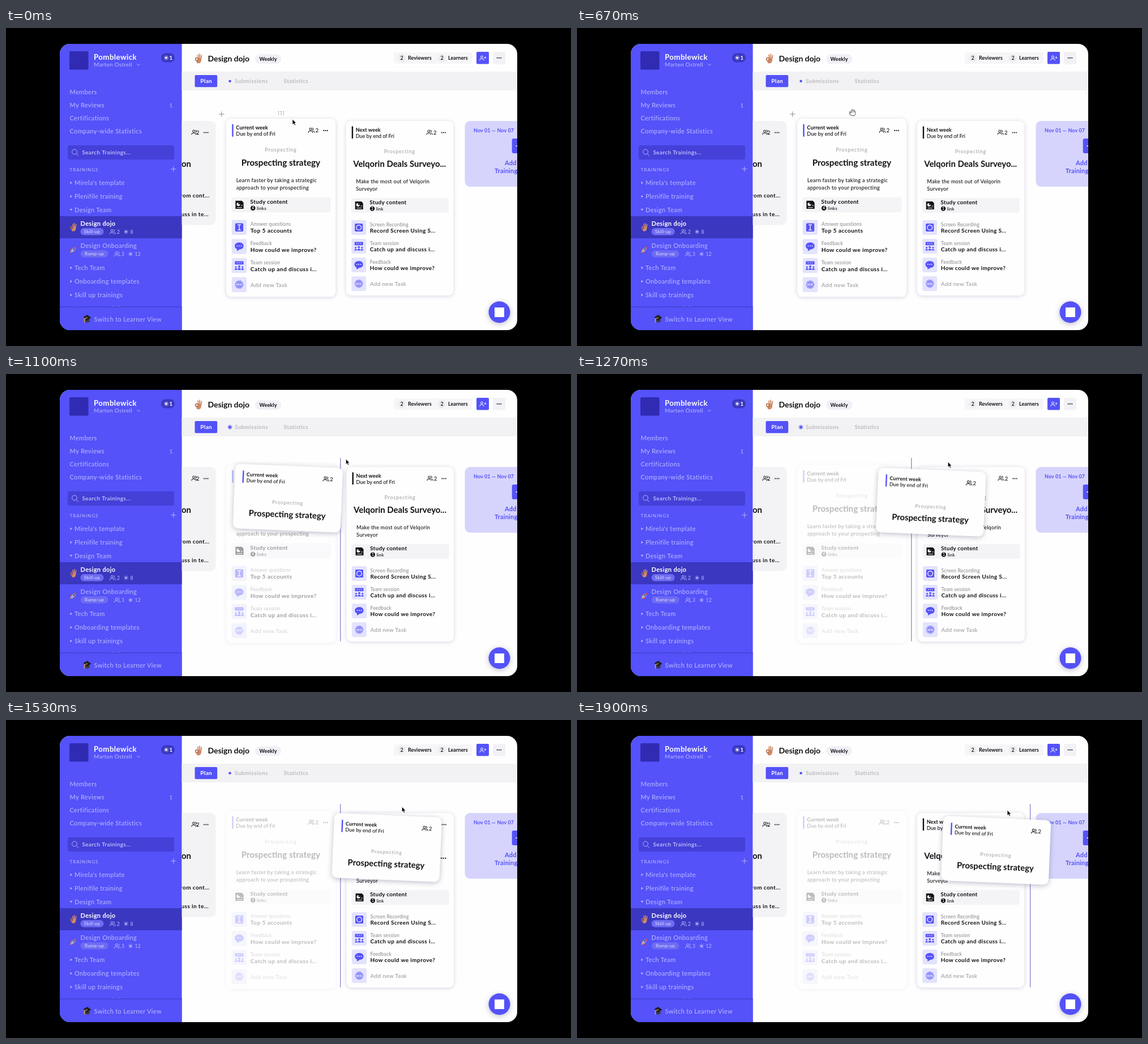
An HTML page that plays this animation: 998x561 px, repeating every 1.93 s.

```html
<!DOCTYPE html>
<html lang="en">
<head>
<meta charset="utf-8">
<title>Training planner</title>
<style>
html, body { margin: 0; width: 100%; height: 100%; overflow: hidden; background: #000; }
svg { display: block; width: 100vw; height: 100vh; font-family: Lato, "Open Sans", sans-serif; }
.shadow { filter: drop-shadow(0 1px 3.5px rgba(40, 38, 110, .2)); }
.lift { filter: drop-shadow(0 2px 5px rgba(40, 38, 90, .3)); }
</style>
</head>
<body>
<svg id="stage" viewBox="0 0 998 561"></svg>
<script>
const LOOP = 1930;
const BLUE = '#5452f8', DEEP = '#3b37c0', PALE = '#b4b2ff', INK = '#111114', GREY = '#a4a4aa', TINT = '#e4e3fd';

const rect = (x, y, w, h, fill, r = 0, extra = '') =>
  `<rect x="${x}" y="${y}" width="${w}" height="${h}" rx="${r}" fill="${fill}" ${extra}/>`;
const circle = (x, y, r, fill, extra = '') => `<circle cx="${x}" cy="${y}" r="${r}" fill="${fill}" ${extra}/>`;
const path = (d, fill, extra = '') => `<path d="${d}" fill="${fill}" ${extra}/>`;
const stroke = (d, color, width = 1) =>
  path(d, 'none', `stroke="${color}" stroke-width="${width}" stroke-linecap="round" stroke-linejoin="round"`);
const group = (x, y, body, extra = '') => `<g transform="translate(${x} ${y})" ${extra}>${body}</g>`;

// y is the optical middle of the line
function text(x, y, str, size, fill, { weight = 500, gap = 0.35, anchor = 'start' } = {}) {
  return `<text x="${x}" y="${y + size * 0.34}" font-size="${size}" font-weight="${weight}" fill="${fill}"
    letter-spacing="${gap}" text-anchor="${anchor}">${str}</text>`;
}

const dots = (x, y, color = INK) => [-3.2, 0, 3.2].map(d => circle(x + d, y, 1.05, color)).join('');
const person = 'M-5 4 V3 Q-5 1.3 -3 1.3 H0 Q2 1.3 2 3 V4';
const head = color => circle(-1.5, -2, 1.9, 'none', `stroke="${color}" stroke-width="1"`);
const people = (x, y, color) => group(x, y, head(color) +
  stroke(person + ' M1.6 -3.9 Q3.4 -3.4 3.4 -2 T1.6 -.2 M3.2 1.4 Q5 1.6 5 3.2 V4', color));
const addPerson = (x, y, color) => group(x, y, head(color) + stroke(person + ' M3 -.8 H6 M4.5 -2.3 V.7', color, .9));
const target = (x, y, color, r = 4) =>
  circle(x, y, r - .5, 'none', `stroke="${color}" stroke-opacity=".45"`) + circle(x, y, r * .52, color);

// Small picture symbols
const okHand = (x, y, s) => group(x, y, `<g transform="scale(${s})">` +
  stroke('M-.2 0 L-.8 -6 M2 0 L2 -7 M3.8 1 L5 -5', '#d08a66', 1.7) +
  path('M0 -1 Q5 -2 4.6 2 Q4 7 1 7.4 H-2 Q-4 6 -3 3 Z', '#d08a66') +
  circle(-2.6, 1, 2.3, 'none', 'stroke="#b97350" stroke-width="1.5"') + '</g>');
const rocket = (x, y) => group(x, y, '<g transform="rotate(45) scale(.9)">' +
  path('M-3 0 L-6 5 L-2 4 Z M3 0 L6 5 L2 4 Z', '#c8405c') + path('M-1.8 5 L0 9 L1.8 5 Z', '#f0a040') +
  path('M0 -8 Q4 -3 2.3 5 H-2.3 Q-4 -3 0 -8 Z', '#9fabcf') + path('M0 -8 Q2 -6 2.4 -4 H-2.4 Q-2 -6 0 -8Z', '#c8405c') +
  circle(0, -1.5, 1.6, '#2d4a86') + '</g>');
const gradCap = (x, y) => group(x, y, path('M-4 -1 H4 V5 Q0 8 -4 5 Z', '#3a3a44') +
  path('M-7 -3 L0 -7 L7 -2 L0 3 Z', '#202028') + stroke('M0 -2 L-5 0 V6', '#e6a94a', 1.3));

const attendee = (x, y, s) => group(x, y, `<g transform="scale(${s})">` +
  circle(0, 0, 1.9, BLUE) + path('M-2.7 6 Q-2.7 2.6 0 2.6 T2.7 6 Z', BLUE) + '</g>');
const taskIcons = {
  cursor: rect(-7, -7, 14, 14, BLUE, 1.5) + stroke('M-2.5 -4.5 H2.5 M0 -4.5 V4.5 M-2.5 4.5 H2.5', '#fff', 1.3),
  record: rect(-7, -7, 14, 14, BLUE, 1.5) + circle(0, 0, 5, '#fff') + circle(0, 0, 3.7, BLUE),
  bubble: path('M0 -7 C10 -7 10 5 1 5 L-4 8 V4.5 C-10 2 -9 -7 0 -7 Z', BLUE) +
    [-3.5, 0, 3.5].map(d => circle(d, -1, .9, '#fff')).join(''),
  session: rect(-7.5, -7.5, 15, 5.8, BLUE, 1) + [-3.5, 0, 3.5].map(d => circle(d, -4.6, .8, '#fff')).join('') +
    attendee(-5.6, 2.6, .8) + attendee(0, 1.6, 1) + attendee(5.6, 2.6, .8),
  badge: `<g opacity=".55">${circle(0, 0, 6.4, BLUE, `stroke="${BLUE}" stroke-width="2" stroke-dasharray="2 1.4"`)}` +
    text(0, 0, 'NEW', 4.4, '#fff', { weight: 800, gap: 0, anchor: 'middle' }) + '</g>'
};
const taskIcon = (y, kind) => group(22.5, y, rect(-13, -13, 26, 26, TINT, 3) + taskIcons[kind]);

const cardHead = (title, color, x = 17, y = 16, iconX = 147.5, iconY = 20) =>
  rect(x - 7, y - 6.5, 2.4, 21.5, color) +
  text(x, y, title, 9, INK, { weight: 700, gap: .1 }) +
  text(x, y + 10.5, 'Due by end of Fri', 9, INK, { gap: 0 }) +
  people(iconX, iconY, INK) + text(iconX + 6.8, iconY + .3, '2', 9.5, INK);

function card({ week, color, title, lines, links, tasks }) {
  const rows = tasks.map(([kind, label, name], i) => {
    const y = 188 + i * 33;
    return taskIcon(y, kind) + text(42, y - 5.3, label, 8.5, '#8e8e95', { gap: .2 }) +
      text(42, y + 6, name, 10, INK, { weight: 700, gap: .4 });
  }).join('');
  return rect(0, 0, 189.5, 308, '#fefefe', 9, 'class="shadow"') +
    cardHead(week, color) + dots(172, 20.5) +
    text(94.5, 54, 'Prospecting', 9, GREY, { gap: .75, anchor: 'middle' }) +
    text(94.5, 76, title, 14.9, INK, { weight: 700, gap: 0, anchor: 'middle' }) +
    lines.map((l, i) => text(17.5, 107 + i * 12.8, l, 9.2, INK, { gap: .25 })).join('') +
    rect(9, 136, 172, 26, '#f4f4f7', 4) +
    group(23, 149, path('M-7 -7 H4 L7 -4 V7 H-7 Z', INK) + circle(-2, -1, 3, '#fff') +
      path('M-2 -1 V-4 A3 3 0 0 1 1 -1 Z', INK) + stroke('M-4 4.7 H4 M3 1 H5', '#fff')) +
    text(41.5, 144, 'Study content', 10, INK, { weight: 700, gap: .25 }) +
    circle(46.3, 154.6, 4.2, INK) + text(46.3, 154.6, links, 6.5, '#fff', { weight: 700, gap: 0, anchor: 'middle' }) +
    text(53, 154.8, links > 1 ? 'links' : 'link', 8, INK, { gap: .1 }) + rows +
    taskIcon(287, 'badge') + text(42, 288, 'Add new Task', 10, GREY, { weight: 600, gap: .3 });
}

const current = card({
  week: 'Current week', color: BLUE, title: 'Prospecting strategy', links: 4,
  lines: ['Learn faster by taking a strategic', 'approach to your prospecting'],
  tasks: [['cursor', 'Answer questions', 'Top 5 accounts'], ['bubble', 'Feedback', 'How could we improve?'],
    ['session', 'Team session', 'Catch up and discuss i...']]
});
const next = card({
  week: 'Next week', color: INK, title: 'Velqorin Deals Surveyo...', links: 1,
  lines: ['Make the most out of Velqorin', 'Surveyor'],
  tasks: [['record', 'Screen Recording', 'Record Screen Using S...'], ['session', 'Team session', 'Catch up and discuss i...'],
    ['bubble', 'Feedback', 'How could we improve?']]
});
const dragged = rect(-95, -57, 190, 114, '#fefefe', 9, 'class="lift"') +
  cardHead('Current week', BLUE, -74.5, -39, 66, -36.5) +
  text(0, 8, 'Prospecting', 9, GREY, { gap: .75, anchor: 'middle' }) +
  text(0, 29, 'Prospecting strategy', 14.8, INK, { weight: 700, gap: 0, anchor: 'middle' });

function sidebar() {
  const menu = ['Members', 'My Reviews', 'Certifications', 'Company-wide Statistics']
    .map((s, i) => text(112.5, 113.5 + i * 22.8, s, 11, PALE)).join('');
  const folder = (y, s, open) => path(open ? `M112.5 ${y - 2} h5 l-2.5 3.6 Z` : `M113.5 ${y - 2.5} v5 l3.6 -2.5 Z`, PALE) +
    text(121, y, s, 11, PALE);
  const item = (y, name, tag, w, a, b, color, weight) => text(131.5, y, name, 11, color, { weight }) +
    rect(131.5, y + 8, w, 12.5, '#6e6bf2', 6.2) +
    text(131.5 + w / 2, y + 14.3, tag, 8.2, '#d6d5ff', { gap: .2, anchor: 'middle' }) +
    people(147.5 + w, y + 14.5, PALE) + text(155 + w, y + 14.8, a, 8.5, PALE) +
    target(171 + w, y + 14.5, PALE) + text(178.5 + w, y + 14.8, b, 8.5, PALE);
  return rect(95, 28, 215.6, 505, BLUE) + rect(112, 41, 33.5, 32.5, '#302bb2', 2) +
    text(155, 51.5, 'Pomblewick', 13.3, '#fff', { weight: 700, gap: .4 }) +
    text(155, 64.8, 'Marten Ostrell', 10, PALE, { gap: .25 }) + stroke('M231.5 63.5 l2.5 2.7 l2.5 -2.7', PALE) +
    rect(274, 44.5, 24, 16, DEEP, 8) + target(283, 52.5, '#fff') + text(288.5, 52.8, '1', 9.5, '#fff', { weight: 700 }) +
    menu + text(288.5, 136.5, '1', 10, PALE) +
    rect(109, 207, 188, 25, '#4440d8', 3) + circle(121, 218.5, 4.4, 'none', `stroke="${PALE}"`) + stroke('M124.3 222 l3.4 3.4', PALE) +
    text(134.5, 219.8, 'Search Trainings...', 10, '#d4d3ff', { gap: .42 }) +
    text(112.5, 249.8, 'TRAININGS', 8, PALE, { gap: .95 }) + stroke('M291.5 248.8 h8.6 M295.8 244.5 v8.6', PALE) +
    folder(273, "Mirela's template") + folder(297, 'Plenifile training') + folder(321, 'Design Team', true) +
    rect(95, 332, 215.6, 39, DEEP) + okHand(119, 351.5, .95) +
    item(345, 'Design dojo', 'Skill-up', 41, '2', '8', '#fff', 700) +
    rocket(119, 391) + item(384.3, 'Design Onboarding', 'Ramp-up', 49, '3', '12', PALE, 500) +
    folder(423, 'Tech Team') + folder(447, 'Onboarding templates') + folder(471, 'Skill up trainings') +
    text(121, 495, 'Customer training', 11, PALE) +
    rect(95, 491.5, 215.6, 42, BLUE) + rect(95, 491.5, 215.6, 1, DEEP) +
    gradCap(143.5, 513) + text(155.5, 514, 'Switch to Learner View', 11, PALE);
}

function header() {
  const counter = (x, label) => circle(x, 52.8, 7.3, '#ededf0') +
    text(x, 53, '2', 9, INK, { weight: 600, gap: 0, anchor: 'middle' }) +
    text(x + 11, 53, label, 9, INK, { weight: 700, gap: .05 });
  return okHand(340, 54, 1.1) + text(356.5, 54.5, 'Design dojo', 14, INK, { weight: 700, gap: -.05 }) +
    rect(440, 46.3, 46, 17, '#f0f0f6', 8.5) + text(463, 55, 'Weekly', 9, INK, { weight: 700, gap: .15, anchor: 'middle' }) +
    rect(685, 43, 139, 20, '#f6f6f8', 2) + counter(699, 'Reviewers') + counter(770, 'Learners') +
    rect(831, 42, 22, 21.5, BLUE, 2) + addPerson(842, 53, '#fff') +
    rect(860, 42, 22, 21.5, '#f2f2f6', 2) + dots(871, 52.8) +
    rect(310.6, 77, 592.4, 33, '#f2f2f4') + rect(333.5, 83, 39.7, 21.3, BLUE, 2) +
    text(353.7, 93.8, 'Plan', 10, '#fff', { weight: 700, anchor: 'middle' }) +
    text(404, 93.8, 'Submissions', 10, '#b4b4b8', { weight: 600, gap: .4 }) +
    text(490.5, 93.8, 'Statistics', 10, '#b4b4b8', { weight: 600, gap: .4 }) +
    circle(395.5, 93.7, 4.2, BLUE, 'id="halo" opacity="0"') + circle(395.5, 93.7, 2.3, BLUE);
}

const bold = { weight: 700, gap: .4, anchor: 'end' };
const pastCard = rect(181, 164, 189.5, 183.5, '#f3f3f5', 9) + people(333, 184, INK) +
  text(336, 184.3, '2', 9.5, INK) + dots(353.3, 184.5) +
  text(327, 240, 'Introduction', 14.9, INK, { ...bold, gap: 0 }) +
  text(359.5, 296, 'Learn from cont...', 10, INK, bold) + text(358, 329, 'Discuss in te...', 10, INK, bold);
const futureCard = rect(810.5, 164, 190, 116, '#d6d4fc', 9) +
  text(826, 181.3, 'Nov 01 — Nov 07', 9, BLUE, { weight: 700, gap: .1 }) +
  rect(893.7, 195, 26, 26, BLUE, 3) + stroke('M901 208 h12', '#fff', 1.5) +
  text(881, 238.5, 'Add', 11, BLUE, { weight: 700, gap: .2 }) + text(863, 252.5, 'Training', 11, BLUE, { weight: 700, gap: .2 });

const handle = [481.5, 485.8, 490.1].map(x => circle(x, 148, .9, '#88888e') + circle(x, 151.8, .9, '#88888e')).join('');
const arrow = path('M0 0 V9.5 L2.2 7.5 L3.8 11 L5.4 10.2 L3.9 6.9 H6.8 Z', '#000', 'stroke="#fff" stroke-width=".7"');
const hand = path('M-3 5.5 L-5.2 1 Q-5.6 -.6 -4 -.4 L-3 1 V-3.4 Q-2.4 -4.7 -1.3 -3.6 V-4.6 Q-.3 -5.8 .7 -4.6 V-4 Q2 -5 2.8 -3.6 V-2.6 Q4.6 -3.2 4.8 -1.4 V2 L3.4 5.5 Z',
  '#fff', 'stroke="#333" stroke-width=".8" stroke-linejoin="round"') + stroke('M-1.2 -3.2 V0 M.8 -4 V0 M2.8 -3 V0', '#333', .6);

const stage = document.getElementById('stage');
stage.innerHTML = `<defs>
    <clipPath id="window">${rect(95, 28, 808, 505, '#fff', 18)}</clipPath>
    <clipPath id="board">${rect(310.6, 110, 592.4, 423, '#fff')}</clipPath>
  </defs>` + rect(0, 0, 998, 561, '#000') +
  `<g clip-path="url(#window)">${rect(95, 28, 808, 505, '#fefefe')}${sidebar()}${header()}
    <g clip-path="url(#board)">${pastCard}${futureCard}
      <g id="current" transform="translate(389 160) scale(1.02)">${current}</g>
      <g id="next">${next}</g>
      <g id="hover">${stroke('M376.5 152 h8.6 M380.8 147.7 v8.6', '#8c8c92')}${handle}</g>
      <rect id="dropLine" y="148" width="1.1" height="323.5" fill="#7670c4"/>
      <g id="dragged">${dragged}</g>
    </g>
    ${circle(871.5, 501.3, 19, BLUE, 'class="lift"')}${rect(863, 493, 17, 17, '#fff')}
    <g id="arrow">${arrow}</g><g id="hand">${hand}</g>
  </g>`;
const part = id => document.getElementById(id);
const ui = Object.fromEntries(['halo', 'current', 'next', 'hover', 'dropLine', 'dragged', 'arrow', 'hand'].map(id => [id, part(id)]));

// Keys: [time, ...values], blended linearly
function track(keys, t) {
  if (t <= keys[0][0]) return keys[0].slice(1);
  const i = keys.findIndex(k => k[0] > t);
  if (i < 0) return keys[keys.length - 1].slice(1);
  const a = keys[i - 1], b = keys[i], p = (t - a[0]) / (b[0] - a[0]);
  return a.slice(1).map((v, j) => v + (b[j + 1] - v) * p);
}
const pointerPath = [[0, 506, 161], [150, 500, 157], [340, 487, 149], [970, 487, 149], [1100, 600, 150], [1270, 655, 155],
  [1530, 699, 153], [1670, 740, 153], [1900, 760, 159], [1930, 761, 159]];
const dragPath = [[980, 486, 217, 0], [1050, 488, 217, 1], [1100, 497, 219, 2.3], [1180, 566, 223, 2.4], [1270, 625, 226, 2.4],
  [1530, 672.5, 225, 2.4], [1670, 697, 223, 2.4], [1900, 740, 230, 2.4], [1930, 743, 230, 2.4]];
const ghostFade = [[980, 1], [1100, .4], [1200, .28]];
const haloPulse = [[780, 0], [1080, .4], [1290, .4], [1500, 0]];
const DRAG_START = 980, LINE_START = 1040, LINE_MOVE = 1640;

const show = (el, on) => el.setAttribute('display', on ? 'inline' : 'none');
const place = (el, x, y, angle = 0) => el.setAttribute('transform', `translate(${x} ${y}) rotate(${angle})`);

function draw(t) {
  const dragging = t >= DRAG_START, overHandle = t >= 340 && !dragging;
  const pointer = track(pointerPath, t);
  place(ui.arrow, ...pointer);
  place(ui.hand, ...pointer);
  show(ui.arrow, !overHandle);
  show(ui.hand, overHandle);
  show(ui.hover, !dragging);
  show(ui.dragged, dragging);
  place(ui.dragged, ...track(dragPath, t));
  ui.current.setAttribute('opacity', track(ghostFade, t)[0]);
  ui.halo.setAttribute('opacity', track(haloPulse, t)[0]);
  show(ui.dropLine, t >= LINE_START);
  ui.dropLine.setAttribute('x', t < LINE_MOVE ? 590.2 : 800);
  place(ui.next, t >= LINE_START && t < LINE_MOVE ? 601.5 : 600.7, 164);
}

const start = performance.now();
function frame() {
  draw((performance.now() - start) % LOOP);
  requestAnimationFrame(frame);
}
frame();
</script>
</body>
</html>
```
